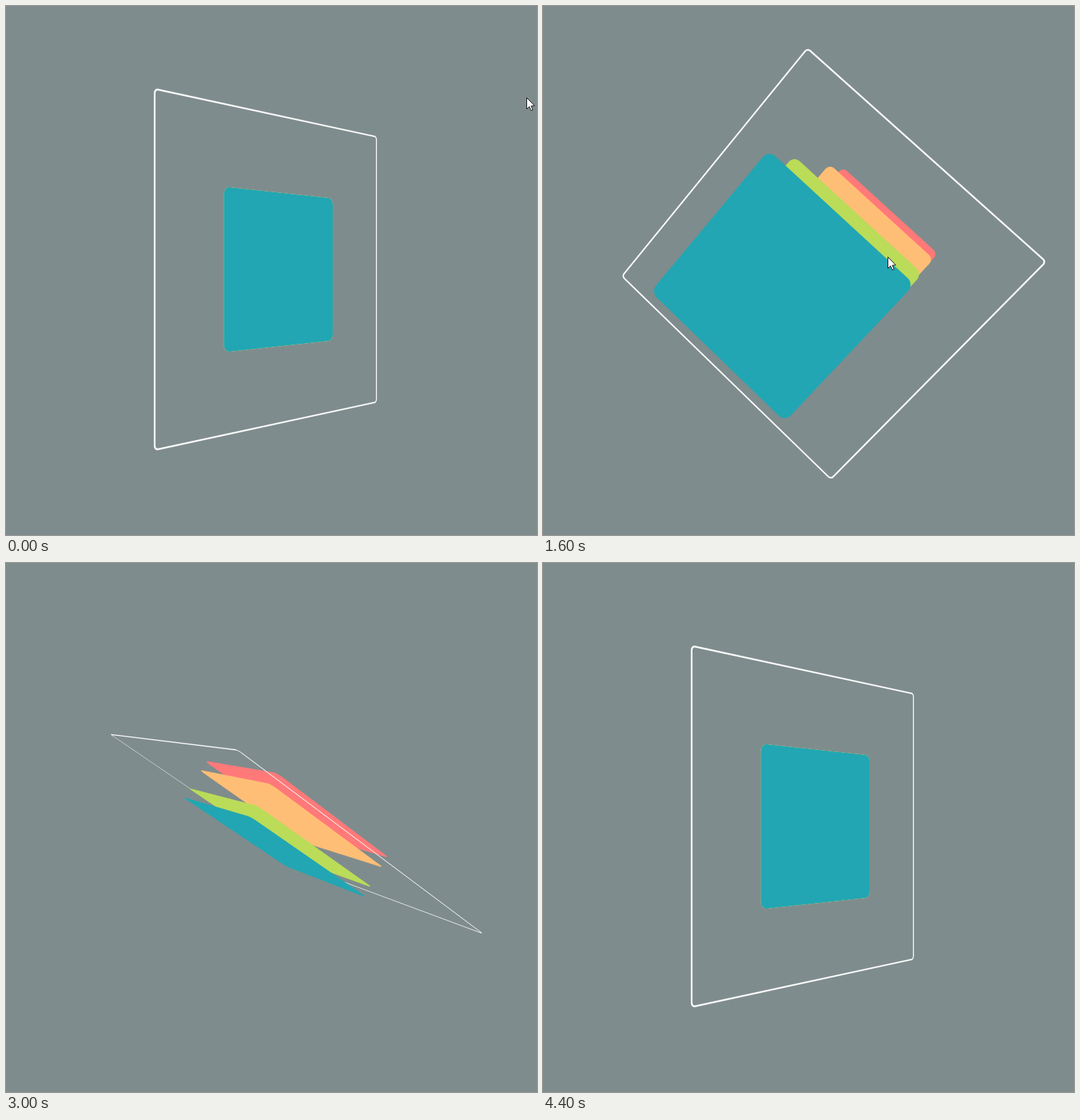
Recreate the animation shown at these times as an HTML page with a canvas. Size 749x747 px, loop 4.5 s.

```html
<!DOCTYPE html>
<html lang="en">
<head>
<meta charset="utf-8">
<title>Layers</title>
<style>
  html, body { margin: 0; width: 100%; height: 100%; overflow: hidden; background: #7f8c8d; }
  canvas { display: block; }
</style>
</head>
<body>
<canvas id="stage" width="749" height="747"></canvas>
<script>
const ctx = document.getElementById('stage').getContext('2d');
const LOOP = 4500, STEP = 100;
const CX = 390, CY = 372, DEPTH = 1000;
const FRAME = 217, BORDER = 2, CARD = 108, GAP = 108;

// The whole stack turns about one axis, from rotateY(45deg) to the tilted pose.
const AXIS = [-0.2513, -0.7541, -0.6068];
const TURN = 168.11 * Math.PI / 180;
const H = Math.SQRT1_2;
const REST = [[H, 0, -H], [0, 1, 0], [H, 0, H]];

// CSS "ease": cubic-bezier(.25, .1, .25, 1)
function ease(p) {
  if (p <= 0) return 0;
  if (p >= 1) return 1;
  let lo = 0, hi = 1;
  for (let i = 0; i < 30; i++) {
    const s = (lo + hi) / 2;
    if (0.75 * s * (1 - s) + s * s * s < p) lo = s; else hi = s;
  }
  return 0.3 * lo * (1 - lo) ** 2 + 3 * lo * lo * (1 - lo) + lo ** 3;
}

const tween = (t, start, span) => ease((t - start) / span);

function rotate(v, angle) {
  const [a, b, c] = AXIS, [x, y, z] = v;
  const cos = Math.cos(angle), sin = Math.sin(angle);
  const along = (a * x + b * y + c * z) * (1 - cos);
  return [
    x * cos + (b * z - c * y) * sin + a * along,
    y * cos + (c * x - a * z) * sin + b * along,
    z * cos + (a * y - b * x) * sin + c * along
  ];
}

function project(basis, x, y, z) {
  const [px, py, pz] = [0, 1, 2].map(i => basis[0][i] * x + basis[1][i] * y + basis[2][i] * z);
  const k = DEPTH / (DEPTH - pz);
  return [CX + px * k, CY + py * k];
}

function roundSquare(basis, half, radius, z) {
  const signs = [[1, 1], [-1, 1], [-1, -1], [1, -1]];
  signs.forEach(([sx, sy], corner) => {
    for (let i = 0; i <= 8; i++) {
      const a = (corner + i / 8) * Math.PI / 2;
      const x = sx * (half - radius) + radius * Math.cos(a);
      const y = sy * (half - radius) + radius * Math.sin(a);
      const p = project(basis, x, y, z);
      if (corner || i) ctx.lineTo(...p); else ctx.moveTo(...p);
    }
  });
  ctx.closePath();
}

function card(basis, color, z) {
  ctx.beginPath();
  roundSquare(basis, CARD, 10, z);
  ctx.fillStyle = color;
  ctx.fill();
}

// The hairline keeps the border visible where it is seen almost edge-on.
function outline(basis) {
  ctx.beginPath();
  roundSquare(basis, FRAME, 6, 0);
  roundSquare(basis, FRAME - BORDER, 4, 0);
  ctx.fillStyle = ctx.strokeStyle = '#fff';
  ctx.lineWidth = 0.25;
  ctx.fill('evenodd');
  ctx.stroke();
}

function pointer(t) {
  const p = Math.min(t / 620, 1), k = p * p * (3 - 2 * p);
  ctx.save();
  ctx.translate(Math.round(734 - 248 * k) + 0.5, Math.round(129 + 225 * k) + 0.5);
  ctx.beginPath();
  [[0, 0], [0, 16], [3.7, 12.6], [6.2, 18.2], [8.6, 17.1], [6.2, 11.7], [11, 11.3]]
    .forEach(([x, y]) => ctx.lineTo(x, y));
  ctx.closePath();
  ctx.fillStyle = '#fff';
  ctx.strokeStyle = '#111';
  ctx.lineWidth = 1;
  ctx.fill();
  ctx.stroke();
  ctx.restore();
}

function draw(t) {
  const spread = GAP * (tween(t, 465, 860) - tween(t, 2519, 860));
  const angle = TURN * (tween(t, 1332.5, 1000) - tween(t, 3384, 1000));
  const basis = REST.map(v => rotate(v, angle));
  ctx.fillStyle = '#7f8c8d';
  ctx.fillRect(0, 0, 749, 747);
  card(basis, '#ff7979', -2 * spread);
  card(basis, '#ffbe76', -spread);
  outline(basis);
  card(basis, '#badc58', spread);
  card(basis, '#22a6b3', 2 * spread);
  if (t < 2500) pointer(t);
}

const start = performance.now();
function tick(now) {
  const t = Math.max(0, now - start) + 5;
  draw(Math.floor(t % LOOP / STEP) * STEP);
  requestAnimationFrame(tick);
}
draw(0);
requestAnimationFrame(tick);
</script>
</body>
</html>
```
